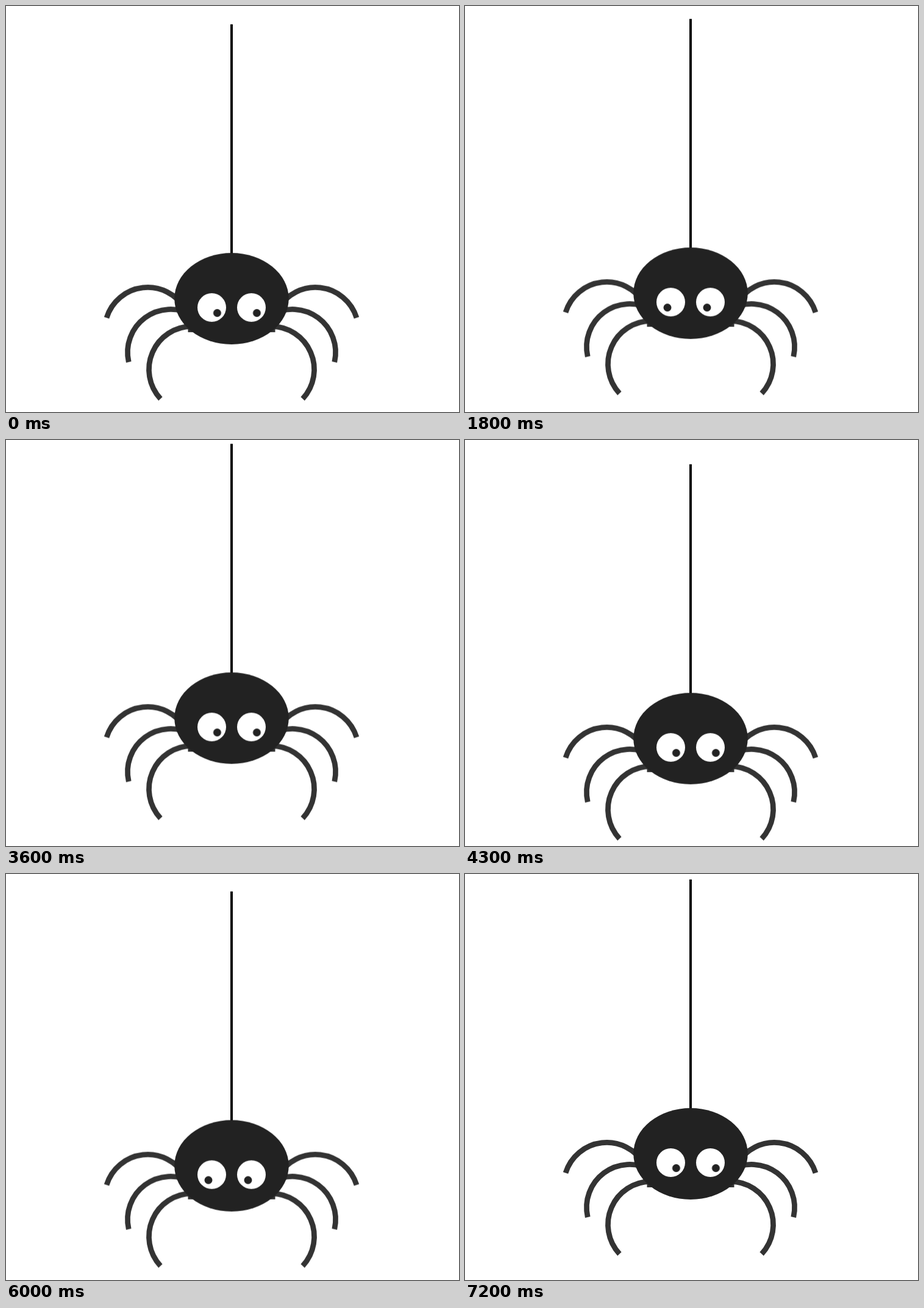
An HTML page without scripts that plays this animation: 743 by 666 pixels, repeating every 7.3 s.

```html
<!DOCTYPE html>
<html lang="en">
<head>
<meta charset="utf-8">
<title>Dangling spider</title>
<style>
  html, body { margin: 0; width: 100%; height: 100%; overflow: hidden; background: #fff; }
  svg { display: block; width: 743px; height: 666px; }
  .spider { animation: bob 7.3s infinite; }
  .pupils { fill: #222; animation: look 7.3s infinite; }
  .legs { fill: none; stroke: #333; stroke-width: 8.75; }

  /* A 2s up-and-down bob with two short pauses; split curves are pieces of "ease". */
  @keyframes bob {
    0% { transform: translateY(30.1px); animation-timing-function: cubic-bezier(.205, .554, .503, 1); }
    8.22%, 35.62%, 63.01% { transform: translateY(42.2px); animation-timing-function: ease; }
    21.23%, 76.03% { transform: translateY(4.7px); animation-timing-function: cubic-bezier(.408, .098, .64, .535); }
    24.66%, 26.03%, 79.45%, 80.82% { transform: translateY(21.2px); animation-timing-function: cubic-bezier(.171, .481, .421, 1); }
    48.63% { transform: translateY(4.7px); animation-timing-function: linear; }
    49.32%, 50.68% { transform: translateY(6.3px); animation-timing-function: cubic-bezier(.208, .216, .271, 1); }
    90.41% { transform: translateY(42.2px); animation-timing-function: cubic-bezier(.301, .09, .349, .785); }
    100% { transform: translateY(6.9px); }
  }

  @keyframes look {
    0%, 5.62%, 33.01%, 60.41%, 87.81%, 100% { transform: translateX(14.4px); }
    8.22%, 30.41%, 63.01%, 85.21% { transform: translateX(0); }
  }
</style>
</head>
<body>
<svg viewBox="0 0 743 666">
  <defs>
    <path id="leg" d="M-67.5-20.6A70.6 70.6 0 0 1 61.1-35.3"/>
    <g id="side">
      <use href="#leg" transform="translate(232.5 502)"/>
      <use href="#leg" transform="translate(270 538) rotate(-30)"/>
      <use href="#leg" transform="translate(305 566) rotate(-60)"/>
      <rect x="298.5" y="496" width="8" height="9" fill="#333" stroke="none"/>
    </g>
  </defs>
  <g class="spider">
    <rect x="368" width="4" height="376"/>
    <g class="legs">
      <use href="#side"/>
      <use href="#side" transform="matrix(-1 0 0 1 740 0)"/>
    </g>
    <ellipse cx="370" cy="450" rx="93.75" ry="75" fill="#222"/>
    <g fill="#fff">
      <circle cx="337.5" cy="464.5" r="23.5"/>
      <circle cx="402.5" cy="464.5" r="23.5"/>
    </g>
    <g class="pupils">
      <circle cx="332" cy="473.5" r="6.5"/>
      <circle cx="397" cy="473.5" r="6.5"/>
    </g>
  </g>
</svg>
</body>
</html>
```
